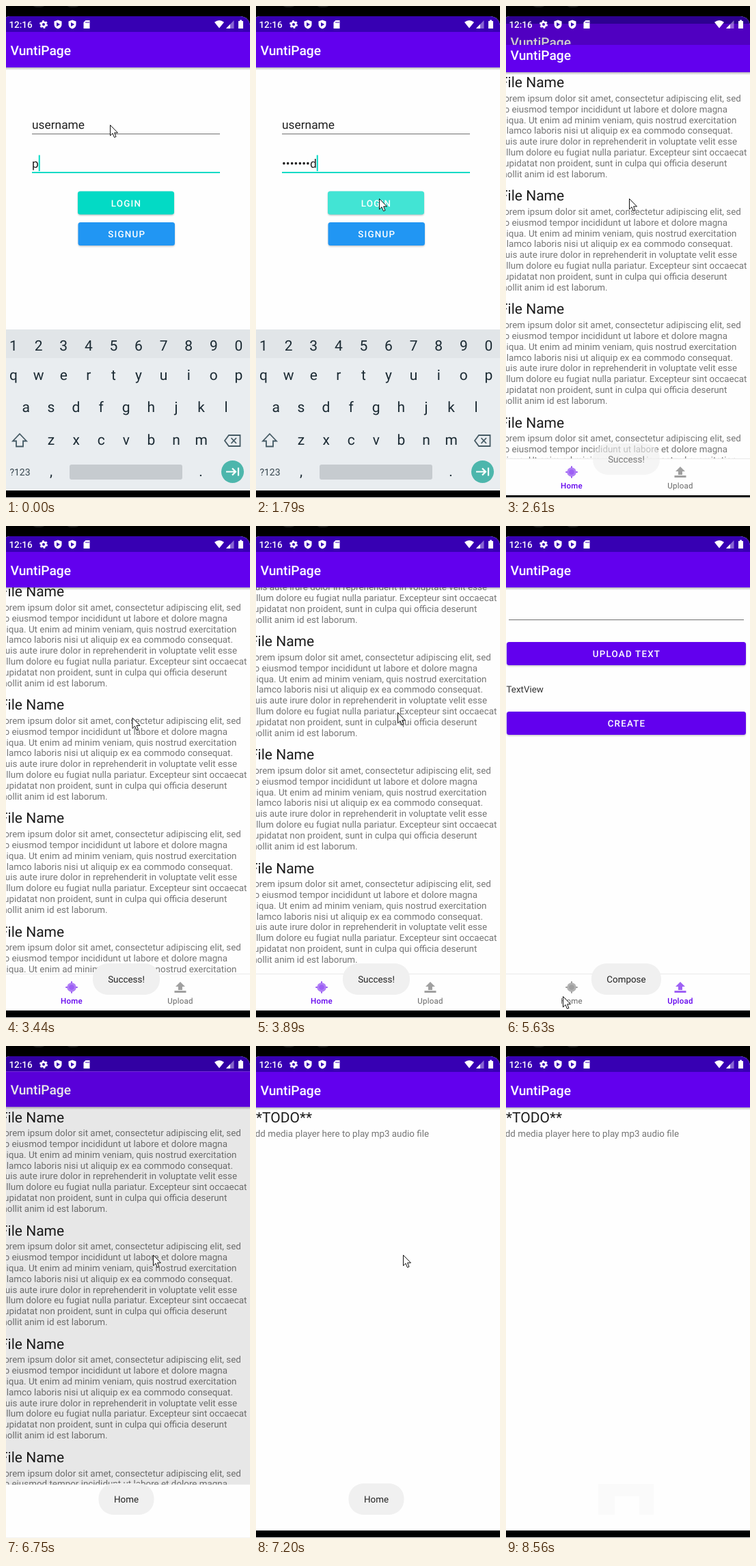
Recreate the animation shown at these times as an HTML page. Size 357 px wide and 721 px high, loop 9490 ms.

```html
<!DOCTYPE html>
<html lang="en">
<head>
<meta charset="utf-8">
<title>App walkthrough</title>
<style>
html, body { margin: 0; width: 100%; height: 100%; overflow: hidden; background: #000; }
svg { display: block; width: 100%; height: 100%; font-family: Roboto, sans-serif; }
text { white-space: pre; text-rendering: geometricPrecision; }
.mid { text-anchor: middle; }
.btn { font-weight: 500; font-size: 13.4px; letter-spacing: 1.2px; fill: #fff; text-anchor: middle; }
.key { font-size: 21px; fill: #1b2a33; text-anchor: middle; }
.nav { font-size: 11.5px; letter-spacing: .25px; text-anchor: middle; }
.tab { fill: #666; }
.tab.on { fill: #6200ee; font-weight: 500; }
</style>
</head>
<body>
<svg id="stage" viewBox="0 0 357 721"></svg>
<script>
const LOOP = 9490;
const $ = id => document.getElementById(id);
const rect = (x, y, w, h, fill, more = '') =>
  `<rect x="${x}" y="${y}" width="${w}" height="${h}" fill="${fill}" ${more}/>`;
const text = (x, y, size, fill, str, more = '') =>
  `<text x="${x}" y="${y}" font-size="${size}" fill="${fill}" ${more}>${str}</text>`;
const at = (x, y, body, more = '') => `<g transform="translate(${x} ${y})" ${more}>${body}</g>`;
const path = (d, more = '') => `<path d="${d}" ${more}/>`;

const button = (x, y, w, fill, label, id = '') =>
  rect(x, y + 1, w, 34.5, '#000', 'rx="4" opacity=".22" filter="url(#soft)"') +
  rect(x, y, w, 34, fill, 'rx="3.5"') +
  (id && rect(x, y, w, 34, '#fff', `rx="3.5" opacity="0" id="${id}"`)) +
  `<text class="btn" x="${x + w / 2 + .5}" y="${y + 22.2}">${label}</text>`;

// A full app window; it is revealed by its own clip and slides inside it.
const appWindow = (id, body) => `
  <clipPath id="${id}Clip"><rect id="${id}Cut" width="357" height="721"/></clipPath>
  <g id="${id}" clip-path="url(#${id}Clip)"><g id="${id}Body">
    ${rect(0, 15, 357, 691, '#fefefe')}${rect(0, 705, 357, 5, '#fff')}
    ${body}
    ${rect(0, 90, 357, 4, 'url(#shade)')}
    ${rect(0, 15, 357, 23, '#3700b3')}${rect(0, 38, 357, 52, '#6200ee')}
    ${text(6.5, 72, 19.2, '#fff', 'VuntiPage', 'font-weight="500"')}
    ${rect(0, 0, 357, 721, '#000', `id="${id}Dim" opacity="0"`)}
  </g></g>`;

const keyRow = (chars, x, y) => [...chars].map((c, i) =>
  `<text class="key" x="${x + i * 36.6}" y="${y}">${c}</text>`).join('');

const keyboard =
  rect(0, 474, 357, 236, '#e9edf0') + rect(0, 474, 357, 42, '#e1e5e8') +
  keyRow('1234567890', 11, 504.5) + keyRow('qwertyuiop', 11, 548) +
  keyRow('asdfghjkl', 29.3, 595) + keyRow('zxcvbnm', 66, 643) +
  text(20.5, 688, 14, '#37474f', '?123', 'class="mid"') +
  keyRow(',', 66, 689) + keyRow('.', 285, 689) +
  rect(93, 672, 165, 22, '#c6cbcf', 'rx="3"') +
  '<g fill="none" stroke="#455a64" stroke-width="1.8">' +
  at(20, 636.5, path('M0-9.5 10 1H5V9H-5V1H-10Z')) +
  at(331, 637, path('M-11 0-5-8H11.5V8H-5ZM-1.5-4 6 4M6-4-1.5 4')) + '</g>' +
  '<circle cx="331.5" cy="682.5" r="16.5" fill="#4db6ac"/>' +
  at(331, 682.5, path('M-9 0H5M0-5 5 0 0 5M9-6V6', 'fill="none" stroke="#fff" stroke-width="2.2"'));

const login =
  text(38, 180, 17.35, '#212121', 'username') + rect(38, 187, 275, 1, '#707070') +
  text(38, 237, 17.35, '#212121', 'p', 'id="pass"') +
  rect(47.5, 218.5, 2, 23.5, '#03dac5', 'id="caret"') + rect(38, 243, 275, 2, '#03dac5') +
  button(105, 271.5, 141, '#03dac5', 'LOGIN', 'ripple') +
  button(105.5, 317, 141.5, '#2196f3', 'SIGNUP') + keyboard;

const lorem = `Lorem ipsum dolor sit amet, consectetur adipiscing elit, sed
do eiusmod tempor incididunt ut labore et dolore magna
aliqua. Ut enim ad minim veniam, quis nostrud exercitation
ullamco laboris nisi ut aliquip ex ea commodo consequat.
Duis aute irure dolor in reprehenderit in voluptate velit esse
cillum dolore eu fugiat nulla pariatur. Excepteur sint occaecat
cupidatat non proident, sunt in culpa qui officia deserunt
mollit anim id est laborum.`.split('\n');

const entry = (title, lines) => text(-9, 112.3, 21, '#1c1c1c', title) +
  lines.map((s, i) => text(-10, 133 + i * 15.8, 13.4, '#757575', s)).join('');

const list = [0, 1, 2, 3, 4].map(i => at(0, i * 166.1, entry('File Name', lorem))).join('');

const upload = rect(4, 137, 344, 1, '#707070') +
  button(1, 170, 350, '#6200ee', 'UPLOAD TEXT') +
  text(.5, 243.5, 13.4, '#333', 'TextView') +
  button(1, 272, 350, '#6200ee', 'CREATE');

const tab = (id, x, icon, label) => `<g id="${id}" class="tab">` + at(x, 676, icon, 'opacity=".62"') +
  `<text class="nav" x="${x}" y="700">${label}</text></g>`;

const nav = rect(0, 656, 357, 49, '#fefefe') + rect(0, 656, 357, 1, '#e9e9e9') +
  rect(0, 705, 357, 5, '#fff') +
  tab('tabHome', 96, '<circle r="6.8" opacity=".8"/><circle r="3.8"/>' +
    path('M-1-8.8H1V-6H-1ZM-1 6H1V8.8H-1ZM-8.8-1H-6V1H-8.8ZM6-1H8.8V1H6Z'), 'Home') +
  tab('tabUpload', 255, path('M0-8 7-1H3V4H-3V-1H-7ZM-8.5 5H8.5V8H-8.5Z'), 'Upload');

const toast = (id, w, label) => `<g id="${id}" opacity="0">` +
  rect(176 - w / 2, 641, w, 46, '#f0f0f0', 'rx="22"') +
  text(176, 669, 13.4, '#222', label, 'class="mid"') + '</g>';

const shield = path('M0-6.5 5.5-4.5V0C5.5 3.5 3 5.5 0 6.5-3 5.5-5.5 3.5-5.5 0V-4.5Z') +
  path('M-2-3 3.2 0-2 3Z', 'fill="#3700b3"');
const statusIcons = '<g fill="#fff">' +
  text(4.5, 31.5, 13.4, '#fff', '12:16', 'font-weight="500"') +
  at(55, 27, '<circle r="3.3" fill="none" stroke="#fff" stroke-width="2.6"/>' +
    '<circle r="5" fill="none" stroke="#fff" stroke-width="2" stroke-dasharray="2.6 2.636"/>') +
  at(76, 27, shield) + at(97, 27, shield) +
  at(118, 27, path('M-1.5-6H4.5V6H-4.5V-3Z') + path('M-1-4V-2M1-4V-2M3-4V-2', 'stroke="#3700b3"')) +
  at(312, 27, path('M-7-3.3Q0-8.7 7-3.3L0 5.5Z')) +
  at(328, 27, path('M5.5-6V6H-6Z', 'opacity=".4"') + path('M0-.2V6H-6Z')) +
  at(343.5, 27, path('M-3.5-5H-1.5V-6.5H1.5V-5H3.5V6H-3.5Z')) + '</g>';

$('stage').innerHTML = `
  <defs>
    <linearGradient id="shade" x2="0" y2="1">
      <stop stop-opacity=".28"/><stop offset="1" stop-opacity="0"/>
    </linearGradient>
    <filter id="soft" x="-5%" y="-20%" width="110%" height="150%"><feGaussianBlur stdDeviation="1"/></filter>
    <clipPath id="phone">${path('M0 720V16.5Q2 15 5 15H343Q355 16 357 28V720Z')}</clipPath>
    <clipPath id="page"><rect y="90" width="357" height="567"/></clipPath>
  </defs>
  ${rect(0, 0, 357, 721, '#000')}
  <g fill="#1d1d1d"><ellipse cx="48" rx="8" ry="2"/><ellipse cx="98" rx="8" ry="2"/></g>
  ${rect(0, 720, 357, 1, '#f4f4f4')}
  <g clip-path="url(#phone)">
    ${appWindow('login', login)}
    ${appWindow('main', `<g clip-path="url(#page)"><g id="list">${list}</g></g><g id="upload">${upload}</g>${nav}`)}
    ${appWindow('todo', entry('**TODO**', ['Add media player here to play mp3 audio file']))}
    ${statusIcons}
  </g>
  <g id="ghost">${rect(135, 642, 81, 45, '#fafafa')}${rect(159, 660, 36, 31, '#fefefe')}</g>
  ${toast('success', 98, 'Success!')}${toast('compose', 102, 'Compose')}${toast('home', 81, 'Home')}
  <g id="mouse">${path('M.5.5V16L4 12.6 6.5 18.5 9 17.5 6.6 11.8H11.5Z', 'fill="#fff" stroke="#111"')}</g>`;

// Bursts of motion: start, end, number of steps. The picture rests between them.
const bursts = [[0, 0, 1], [120, 690, 5], [1280, 2060, 7], [2460, 2880, 4], [3440, 4400, 8],
  [4550, 5510, 8], [5630, 5630, 1], [5940, 6900, 8], [7050, 7200, 2], [7510, 8410, 8], [8560, 8560, 1]];

function snap(t) {
  const [a, b, n] = bursts.filter(s => s[0] <= t).pop();
  if (n === 1) return a;
  const step = (b - a) / (n - 1);
  return a + Math.min(n - 1, Math.floor((t - a + 25) / step)) * step;
}

// Linear interpolation through [time, value] points.
function track(keys, t) {
  const i = keys.findIndex(k => k[0] > t);
  if (i === 0) return keys[0][1];
  if (i < 0) return keys[keys.length - 1][1];
  const [a, u] = keys[i - 1], [b, v] = keys[i];
  return u + (v - u) * (t - a) / (b - a);
}

const mouse = [[1200, 152, 174], [1670, 180, 282], [3400, 180, 282], [3577, 200, 276],
  [3851, 207, 273], [3989, 207, 273], [4400, 259, 677], [4824, 259, 677], [5510, 85, 690],
  [5630, 83, 689], [6077, 83, 689], [6626, 215, 306], [7450, 215, 306], [7896, 148, 480],
  [8281, 181, 672]];
const mouseX = mouse.map(k => [k[0], k[1]]);
const mouseY = mouse.map(k => [k[0], k[2]]);
const toasts = {
  success: [[2460, 0], [2600, .6], [2740, 1], [4263, 1], [4400, .58], [4500, 0]],
  compose: [[4687, 0], [4961, 1], [6077, 1], [6300, 0]],
  home: [[6351, 0], [6626, 1], [8153, 1], [8410, .25], [8500, 0]]
};

// A window slides in while uncovered from the bottom up; the one below dims and lifts.
const MAIN_OPENS = 2460, TODO_OPENS = 6760, OPENING = 420;
const slide = [[0, 28], [140, 7], [280, 2], [OPENING, 0]];
const reveal = [[0, 655], [140, 57], [280, 20], [OPENING, 0]];
const lift = [[0, -.5], [140, -12], [280, -14]];
const dim = [[-1, 0], [0, .09], [140, .19], [280, .2]];

const set = (id, name, value) => $(id).setAttribute(name, value);
const show = (id, on) => set(id, 'display', on ? 'inline' : 'none');
const move = (id, x, y) => set(id, 'transform', `translate(${x} ${y})`);

function place(id, q, opens, covered) {
  const age = q - opens, under = q - covered;
  show(id, age >= 0 && under < OPENING);
  move(id + 'Body', 0, under >= 0 ? track(lift, under) : track(slide, age));
  set(id + 'Cut', 'y', track(reveal, age));
  set(id + 'Dim', 'opacity', track(dim, under));
}

function draw(t) {
  const q = snap(t);

  const n = q < 120 ? 1 : Math.min(8, Math.round(1 + 1.4 * ((q - 120) / 142.5 + 1)));
  $('pass').textContent = '•'.repeat(n - 1) + 'password'[n - 1];
  show('caret', q < 1280 || (q - 1280) % 1000 >= 500);
  set('ripple', 'opacity', track([[1670, 0], [1800, .25], [1930, .15], [2060, 0]], q));

  place('login', q, -OPENING, MAIN_OPENS);
  place('main', q, MAIN_OPENS, TODO_OPENS);
  place('todo', q, TODO_OPENS, LOOP);
  if (q < MAIN_OPENS) set('caret', 'x', 38 + $('pass').getComputedTextLength());

  const onUpload = q >= 4687 && q < 6077;
  show('list', !onUpload);
  show('upload', onUpload);
  move('list', 0, q < 4687 ? -track([[3400, 0], [3851, 102], [3989, 132]], q) : 0);
  $('tabHome').classList.toggle('on', !onUpload);
  $('tabUpload').classList.toggle('on', onUpload);

  for (const id in toasts) set(id, 'opacity', track(toasts[id], q));
  show('ghost', q >= 8560);
  show('mouse', q < 8560);
  move('mouse', track(mouseX, q), track(mouseY, q));
}

function frame() {
  draw(performance.now() % LOOP);
  requestAnimationFrame(frame);
}
frame();
</script>
</body>
</html>
```
